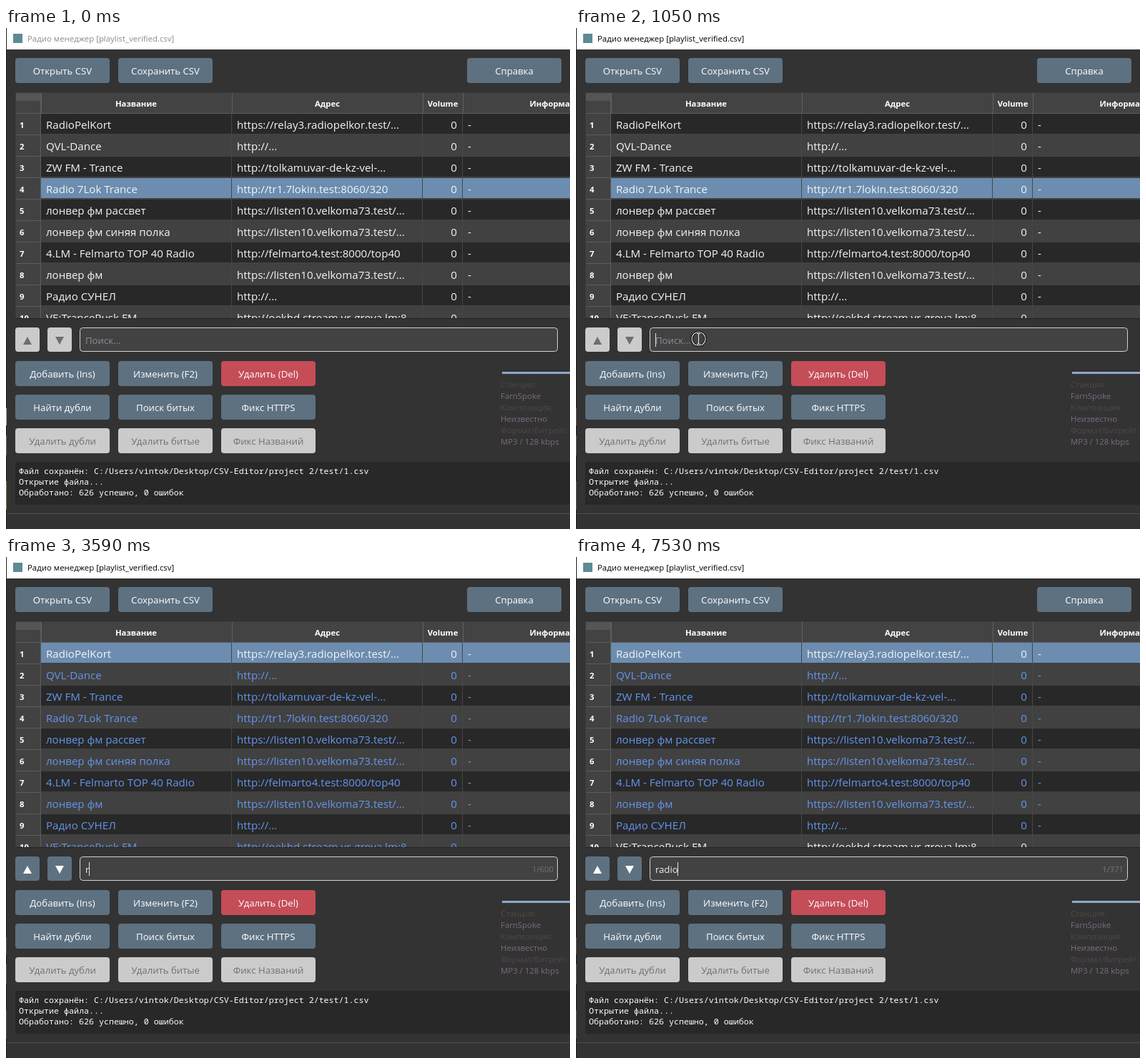
An HTML page that plays this animation: 789x701 px, repeating every 8 s.

```html
<!DOCTYPE html>
<html lang="ru">
<head>
<meta charset="utf-8">
<title>Радио менеджер</title>
<style>
html, body { margin: 0; width: 100%; height: 100%; overflow: hidden; background: #333; }
svg { display: block; }
text { font-family: "Open Sans", "Noto Sans", sans-serif; white-space: pre; }
.mono { font-family: "Noto Sans Mono", "DejaVu Sans Mono", monospace; }
.bold { font-weight: 700; }
</style>
</head>
<body>
<svg id="stage" width="789" height="701" viewBox="0 0 789 701"></svg>
<script>
const LOOP = 8000;
const NS = 'http://www.w3.org/2000/svg';
const stage = document.getElementById('stage');
const BLUE = '#6c8db0', STEEL = '#5d7181', GREY = '#cbcbcb', LINK = '#6495ed', WHITE = '#f4f4f4';

function add(tag, attrs, parent = stage) {
  const el = document.createElementNS(NS, tag);
  for (const key in attrs) el.setAttribute(key, attrs[key]);
  parent.appendChild(el);
  return el;
}
const rect = (x, y, width, height, fill, more, parent) =>
  add('rect', { x, y, width, height, fill, ...more }, parent);
function label(str, x, y, size, fill, more, parent) {
  const el = add('text', { x, y, 'font-size': size, fill, ...more }, parent);
  el.textContent = str;
  return el;
}
const middle = { 'text-anchor': 'middle' };
const end = { 'text-anchor': 'end' };
const show = (el, on) => el.setAttribute('visibility', on ? 'visible' : 'hidden');

function button(str, x, y, fill = STEEL, color = '#fff') {
  const box = rect(x, y, 132, 35, fill, { rx: 4 });
  label(str, x + 66, y + 23, 13.2, color, middle);
  return box;
}

// Window frame
rect(0, 0, 789, 701, '#333');
rect(0, 0, 789, 30, '#fff');
rect(0, 0, 1, 701, '#1c1c1c');
const edgeIdle = add('g', {}), edgeActive = add('g', {});
rect(0, 532, 1, 24, '#aeb9c4', {}, edgeIdle);
rect(0, 570, 1, 28, '#55727c', {}, edgeIdle);
rect(0, 634, 1, 40, '#7c8048', {}, edgeIdle);
rect(0, 532, 1, 24, '#6b4a4a', {}, edgeActive);
rect(0, 570, 1, 28, '#4a5c66', {}, edgeActive);
rect(0, 634, 1, 40, '#5a4c38', {}, edgeActive);
rect(10, 8, 13, 13, '#5d8a95');
const caption = label('Радио менеджер [playlist_verified.csv]', 30, 19, 11.4, '#000');

button('Открыть CSV', 13, 42);
button('Сохранить CSV', 157, 42);
button('Справка', 645, 42);

// Table
const columns = [49, 316, 583, 639];
const stations = [
  ['RadioPelKort', 'https://relay3.radiopelkor.test/...'],
  ['QVL-Dance', 'http://...'],
  ['ZW FM - Trance', 'http://tolkamuvar-de-kz-vel-...'],
  ['Radio 7Lok Trance', 'http://tr1.7lokin.test:8060/320'],
  ['лонвер фм рассвет', 'https://listen10.velkoma73.test/...'],
  ['лонвер фм синяя полка', 'https://listen10.velkoma73.test/...'],
  ['4.LM - Felmarto TOP 40 Radio', 'http://felmarto4.test:8000/top40'],
  ['лонвер фм', 'https://listen10.velkoma73.test/...'],
  ['Радио СУНЕЛ', 'http://...'],
  ['VE:TranceRusk.FM', 'http://oekhd.stream.vr-grova.lm:8...']
];
const clip = add('clipPath', { id: 'view' });
rect(13, 90, 776, 316, '#000', {}, clip);
const table = add('g', { 'clip-path': 'url(#view)' });

rect(13, 90, 776, 30, '#434343', {}, table);
rect(14, 91, 34, 11, '#555', {}, table);
[['Название', 182], ['Адрес', 449.5], ['Volume', 611], ['Информация', 772]].forEach(([str, x]) =>
  label(str, x, 110, 11.3, '#fff', { class: 'bold', ...middle }, table));

const rows = stations.map(([name, url], i) => {
  const y = 120 + i * 30;
  const base = i % 2 ? '#414141' : '#282828';
  const bg = rect(49, y, 740, 28, base, {}, table);
  rect(49, y + 28, 740, 2, '#424242', {}, table);
  rect(13, y, 35, 30, '#424242', {}, table);
  rect(13, y + 29, 35, 1, '#5c5c5c', {}, table);
  label(i + 1, 19, y + 20, 11.3, '#fff', { class: 'bold' }, table);
  const cells = add('g', { fill: WHITE, 'font-size': 15.1 }, table);
  [[name, 56], [url, 323], ['0', 631, end], ['-', 646]].forEach(([str, x, more]) => {
    add('text', { x, y: y + 21, ...more }, cells).textContent = str;
  });
  return { bg, base, cells };
});
columns.forEach(x => {
  rect(x, 90, 1, 30, '#606060', {}, table);
  if (x > 49) rect(x - 1, 120, 1, 286, '#474747', {}, table);
});
rect(48, 90, 1, 316, '#5c5c5c', {}, table);
rect(13, 119, 776, 1, '#5c5c5c', {}, table);
add('path', { d: 'M13.5 406V90.5H789', fill: 'none', stroke: '#3c3c3c' });
rect(13, 406, 776, 1, '#242424');

// Search bar
const arrows = [[13, 'M24 443L30 432L36 443Z'], [58, 'M69 432L75 443L81 432Z']].map(([x, d]) => ({
  box: rect(x, 419, 34, 34, GREY, { rx: 4 }),
  tip: add('path', { d })
}));
rect(103.5, 419.5, 668, 33, '#424242', { rx: 4, stroke: '#d2d2d2' });
const hint = label('Поиск...', 111, 442, 13.2, '#87909b');
const query = label('', 111, 442, 13.1, '#eee');
const counter = label('', 766, 441, 11.3, '#747474', end);
const caret = rect(111, 427, 1, 19, '#e4e4e4');

// Command buttons
button('Добавить (Ins)', 13, 466);
const edit = button('Изменить (F2)', 157, 466);
button('Удалить (Del)', 301, 466, '#c44d58');
button('Найти дубли', 13, 513);
const scan = button('Поиск битых', 157, 513);
button('Фикс HTTPS', 301, 513);
['Удалить дубли', 'Удалить битые', 'Фикс Названий'].forEach((str, i) =>
  button(str, 13 + i * 144, 560, GREY, '#707070'));

// Player info
rect(694, 481, 95, 3, '#8fa9ca');
['Станция:', 'FarnSpoke', 'Композиция:', 'Неизвестно', 'Формат/Битрейт:', 'MP3 / 128 kbps'].forEach((str, i) =>
  label(str, 692, 503 + i * 16, 11.4, i % 2 ? '#7d6a80' : '#504749'));

// Log
rect(13, 607, 776, 60, '#282828');
[
  'Файл сохранён: C:/Users/vintok/Desktop/CSV-Editor/project 2/test/1.csv',
  'Открытие файла...',
  'Обработано: 626 успешно, 0 ошибок'
].forEach((str, i) => label(str, 18, 624 + i * 15, 11.667, '#fff', { class: 'mono' }));
rect(1, 679, 788, 1, '#4f4f4f');

// Pointer
const arrow = add('path', {
  d: 'M.5 .5V16.5L4.2 13L7 19L9.4 18L6.7 12.2H12Z',
  fill: '#fff', stroke: '#000', 'stroke-width': 1
});
const beam = add('g', { fill: 'none' });
const ring = add('circle', { stroke: '#000' }, beam);
const ringInner = add('circle', { stroke: '#eee' }, beam);
add('path', { d: 'M-2.5 -7.5H2.5M0 -7.5V7.5M-2.5 7.5H2.5', stroke: '#eee' }, beam);

// time, x, y
const moves = [
  [120, 307, 678], [180, 283, 630], [240, 246, 584], [300, 212, 552],
  [360, 193, 531], [420, 186, 514], [480, 180, 491], [540, 175, 469],
  [600, 172, 451], [660, 171, 443], [730, 171, 438], [800, 171, 435]
];
// time, ring radius
const clicks = [[0, 0], [1050, 9.5], [1170, 7], [1220, 4.5], [1270, 0]];
// time, typed letters, caret shown
const typing = [
  [0, 0, 0], [1050, 0, 1], [2310, 0, 0], [2470, 1, 1], [3060, 1, 0], [3590, 1, 1],
  [3680, 2, 1], [4240, 2, 0], [4770, 2, 1], [4950, 3, 1], [5450, 4, 1], [5850, 5, 1],
  [7250, 5, 0], [7530, 5, 1]
];
const caretX = [111, 116, 123, 131, 134, 142];
const found = ['', '1/600', '1/414', '1/382', '1/371', '1/371'];
const at = (steps, t) => steps.filter(s => s[0] <= t).pop();

function drawPointer(t) {
  const step = t < 1320 && at(moves, t);
  const [, x, y] = step || [0, 0, 0];
  const inField = y > 418 && y < 454;
  show(arrow, step && !inField);
  show(beam, step && inField);
  arrow.setAttribute('transform', `translate(${x} ${y})`);
  beam.setAttribute('transform', `translate(${x + 0.5} ${y})`);
  const r = at(clicks, t)[1];
  ring.setAttribute('r', r);
  ringInner.setAttribute('r', r);
  ring.setAttribute('stroke-width', r ? 3 : 0);
  ringInner.setAttribute('stroke-width', r ? 1.2 : 0);
  edit.setAttribute('fill', y >= 466 && y < 501 ? BLUE : STEEL);
  scan.setAttribute('fill', y >= 513 && y < 548 ? BLUE : STEEL);
}

function drawSearch(t) {
  const [, n, blink] = at(typing, t);
  query.textContent = 'radio'.slice(0, n);
  counter.textContent = found[n];
  show(hint, !n);
  show(caret, blink);
  caret.setAttribute('x', caretX[n]);
  arrows.forEach(a => {
    a.box.setAttribute('fill', n ? STEEL : GREY);
    a.tip.setAttribute('fill', n ? '#fff' : '#6e6e6e');
  });
  const picked = n ? 0 : 3;
  rows.forEach((row, i) => {
    const match = n && i !== picked && (i < 9 || n < 3);
    row.bg.setAttribute('fill', i === picked ? BLUE : row.base);
    row.cells.setAttribute('fill', match ? LINK : WHITE);
  });
}

const start = performance.now();
function tick() {
  const t = (performance.now() - start) % LOOP;
  const active = t >= 1050;
  caption.setAttribute('fill', active ? '#000' : '#8c8c8c');
  show(edgeIdle, !active);
  show(edgeActive, active);
  drawPointer(t);
  drawSearch(t);
  requestAnimationFrame(tick);
}
tick();
</script>
</body>
</html>
```
